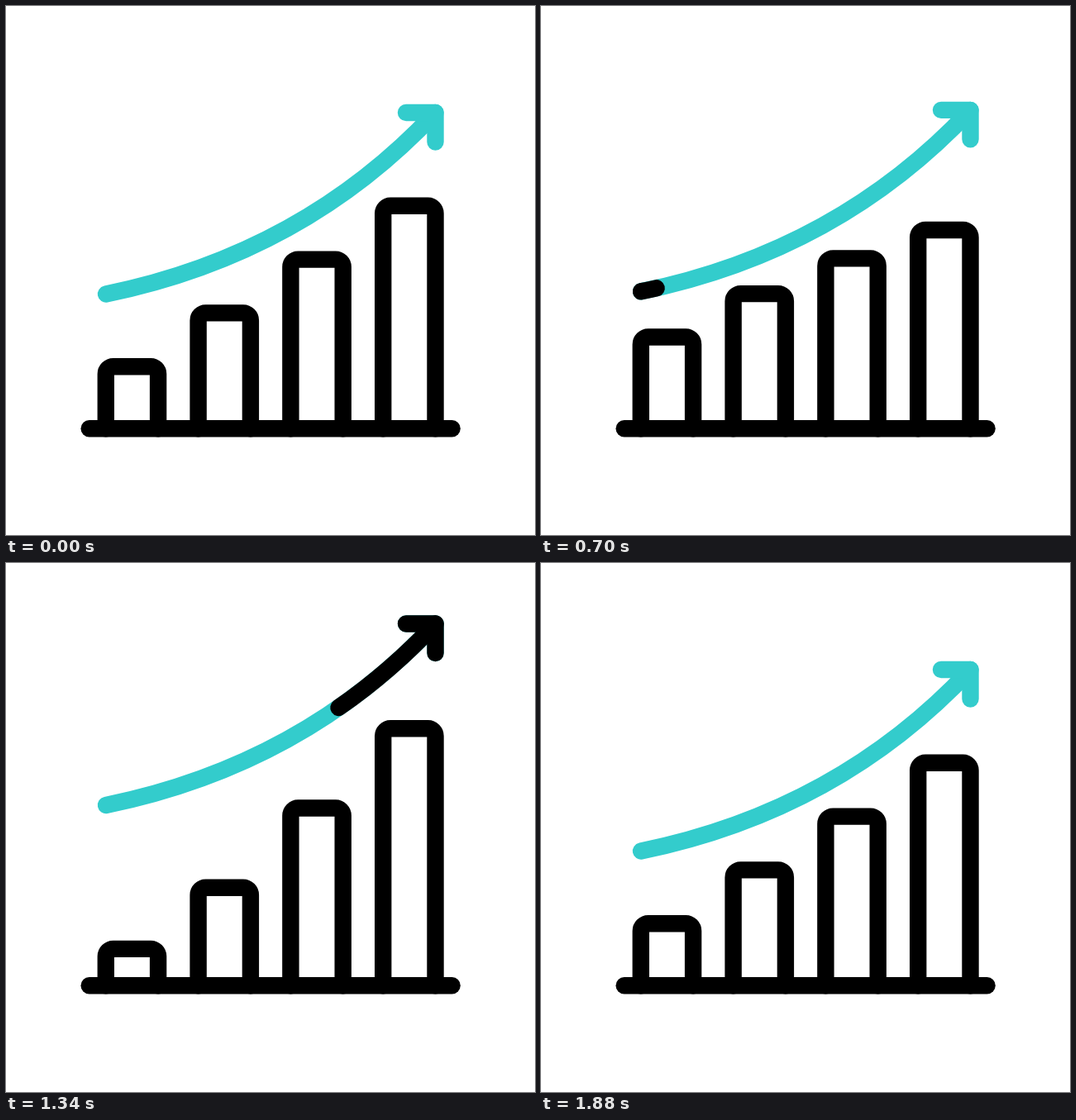
Animation of 640x640 px, one loop 2180 ms. Source, as an HTML page with a canvas:

```html
<!DOCTYPE html>
<html lang="en">
<head>
<meta charset="utf-8">
<title>Growth chart</title>
<style>
  html, body { margin: 0; width: 100%; height: 100%; overflow: hidden; background: #fff; }
  canvas { display: block; width: 100vmin; height: 100vmin; }
</style>
</head>
<body>
<canvas id="stage" width="640" height="640"></canvas>
<script>
const ctx = document.getElementById('stage').getContext('2d');
const LOOP = 2180, STEP = 20;
const TEAL = '#33cccc', BLACK = '#000';
const BASE_Y = 511.3, WEIGHT = 20.4;
const TAIL = [121, 348.5], BEND = [360, 299.5], TIP = [519.5, 129], ARM = 35.5;

const clamp = u => Math.min(1, Math.max(0, u));
const part = (t, a, b) => clamp((t - a) / (b - a));
const smooth = u => u * u * (3 - 2 * u);
const easeOut = u => 1 - Math.pow(1 - u, 3.3);

function bezier(x1, y1, x2, y2) {
  const at = (s, a, b) => 3 * a * s * (1 - s) ** 2 + 3 * b * s * s * (1 - s) + s ** 3;
  return u => {
    let lo = 0, hi = 1;
    for (let i = 0; i < 24; i++) {
      const mid = (lo + hi) / 2;
      if (at(mid, x1, x2) < u) lo = mid; else hi = mid;
    }
    return at((lo + hi) / 2, y1, y2);
  };
}
const dip = bezier(0.25, 0, 0.45, 1);
const rise = bezier(0.167, 0.167, 0.13, 1);

// Each key: start, end, target value, easing
function track(keys, t) {
  let v = 0;
  for (const [a, b, to, ease] of keys) {
    if (t <= a) break;
    v += (to - v) * ease(part(t, a, b));
  }
  return v;
}
const BAR_KEYS = [
  [0, 240, 33, dip],
  [240, 840, -51.2, rise],
  [840, 1120, 31, smooth],
  [1120, 1440, 0, smooth]
];
const ARROW_KEYS = [
  [692, 1240, -66.2, easeOut],
  [1275, 1560, 14.5, smooth],
  [1560, 1880, 0, smooth]
];

function curveLength() {
  const point = (s, k) => (1 - s) ** 2 * TAIL[k] + 2 * s * (1 - s) * BEND[k] + s * s * TIP[k];
  let sum = 0;
  for (let i = 0; i < 200; i++) {
    const a = i / 200, b = (i + 1) / 200;
    sum += Math.hypot(point(b, 0) - point(a, 0), point(b, 1) - point(a, 1));
  }
  return sum;
}
const LENGTH = curveLength();

function drawBar(i, shift) {
  const x = 120.8 + 111.8 * i, w = 63.3;
  const top = 436.2 - 64.8 * i + shift;
  ctx.beginPath();
  ctx.moveTo(x, BASE_Y);
  ctx.arcTo(x, top, x + w, top, 9);
  ctx.arcTo(x + w, top, x + w, BASE_Y, 9);
  ctx.lineTo(x + w, BASE_Y);
  ctx.stroke();
}

function drawCurve(from, to) {
  if (to <= from) return;
  ctx.setLineDash([(to - from) * LENGTH, LENGTH * 3]);
  ctx.lineDashOffset = -from * LENGTH;
  ctx.beginPath();
  ctx.moveTo(...TAIL);
  ctx.quadraticCurveTo(...BEND, ...TIP);
  ctx.stroke();
  ctx.setLineDash([]);
}

function drawHead(from, to) {
  if (to <= from) return;
  const [x, y] = TIP, a = from * ARM, b = to * ARM;
  ctx.beginPath();
  ctx.moveTo(x - b, y);
  ctx.lineTo(x - a, y);
  if (from > 0) ctx.moveTo(x, y + a); else ctx.lineTo(x, y);
  ctx.lineTo(x, y + b);
  ctx.stroke();
}

function drawArrow(t) {
  ctx.save();
  ctx.translate(0, track(ARROW_KEYS, t));
  ctx.strokeStyle = TEAL;
  drawCurve(0, 1);
  drawHead(0, 1);
  ctx.strokeStyle = BLACK;
  drawCurve(part(t, 1154, 1434), part(t, 682, 1122));
  drawHead(part(t, 1430, 1510), part(t, 1120, 1245));
  ctx.restore();
}

function draw(t) {
  ctx.fillStyle = '#fff';
  ctx.fillRect(0, 0, 640, 640);
  ctx.lineWidth = WEIGHT;
  ctx.lineCap = ctx.lineJoin = 'round';
  ctx.strokeStyle = BLACK;
  for (let i = 0; i < 4; i++) drawBar(i, track(BAR_KEYS, t - 200 - 80 * i));
  ctx.beginPath();
  ctx.moveTo(100.7, BASE_Y);
  ctx.lineTo(539.6, BASE_Y);
  ctx.stroke();
  drawArrow(t);
}

const start = performance.now();
function tick() {
  const t = (performance.now() - start) % LOOP;
  draw(Math.floor(t / STEP) * STEP);
  requestAnimationFrame(tick);
}
tick();
</script>
</body>
</html>
```
